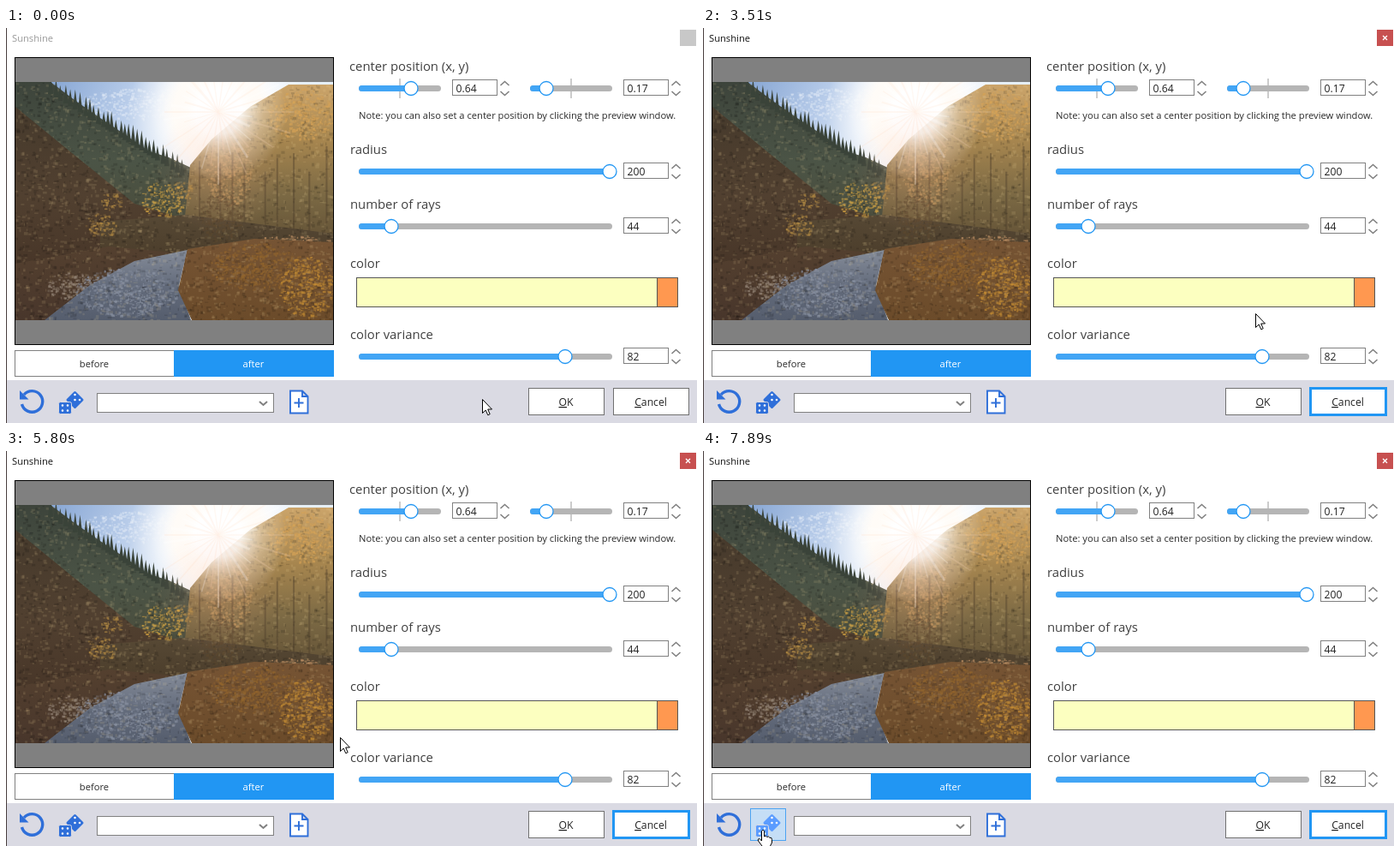
An HTML page with a canvas that plays this animation: 807x461 px, repeating every 8000 ms.

```html
<!DOCTYPE html>
<html lang="en">
<head>
<meta charset="utf-8">
<title>Sunshine</title>
<style>
html, body { margin: 0; width: 807px; height: 461px; overflow: hidden; background: #fff; }
canvas, svg { position: absolute; left: 0; top: 0; }
canvas { left: 11px; top: 63px; }
text { font: 11.2px "Open Sans", "Noto Sans", sans-serif; fill: #2a2a2a; }
.head { font-size: 14.85px; fill: #404040; }
.val, .btn { font-size: 12.2px; fill: #222; }
.mid { text-anchor: middle; }
.tip text { font-size: 11.35px; fill: #505050; }
.line { fill: none; stroke: #808080; stroke-width: 1.6; }
.box { fill: #fff; stroke: #808080; }
.hot { fill: none; stroke: #2196f3; stroke-width: 3; }
.icon { fill: none; stroke: #2f6fd9; }
</style>
</head>
<body>
<canvas id="photo" width="372" height="278"></canvas>
<svg width="807" height="461" viewBox="0 0 807 461">
  <path d="M.5 0V461" stroke="#4a4040"/>
  <text id="title" x="7" y="16">Sunshine</text>
  <g id="shut"><rect x="787" y="2" width="19" height="19"/><path id="cross" d="M794 9l5 5m0-5l-5 5" stroke="#fff" stroke-width="1.3"/></g>

  <path d="M11 35H382V63H11zM11 341H382V370H11z" fill="#808080"/>
  <rect x="10.5" y="34.5" width="372" height="335" fill="none" stroke="#000"/>
  <rect class="box" x="10.5" y="376.5" width="186" height="30"/>
  <rect id="after" x="196" y="376" width="187" height="31"/>
  <text class="mid" x="103" y="396">before</text>
  <text class="mid" x="289" y="396" style="fill:#fff">after</text>

  <g id="panel"></g>
  <text x="412" y="106">Note: you can also set a center position by clicking the preview window.</text>
  <g stroke="#555"><rect x="409.5" y="291.5" width="375" height="34" fill="#fcffc0"/><path d="M760.5 291.5h24v34h-24z" fill="#ff9850"/></g>
  <rect id="color" class="hot" x="409.5" y="291.5" width="351" height="34"/>

  <path d="M1 411H807V461H1z" fill="#dadae3"/>
  <g class="icon" stroke-width="3.4"><path d="M21 428A12.3 12.3 0 1 1 18.500 439"/><path d="M16 423v10.500h10.500z" fill="#2f6fd9" stroke="none"/></g>
  <rect id="dice" x="55.5" y="417.5" width="41" height="37" fill="#c5def6" stroke="#4ba3f2"/>
  <g id="dies">
    <rect x="73" y="426.5" width="15" height="15" rx="1.5" transform="rotate(45 80.5 434)"/>
    <rect x="61.5" y="436.5" width="15" height="14" rx="2" stroke="#dadae3"/>
    <path d="M66 440.500h0M72 440.500h0M66 446.500h0M72 446.500h0M80.500 428h0M80.500 434h0M86 434h0" stroke="#fff" stroke-width="2.6" stroke-linecap="round"/>
  </g>
  <rect class="box" x="106.5" y="426.5" width="206" height="22"/>
  <rect id="combo" class="hot" x="106.5" y="426.5" width="206" height="22"/>
  <path id="drop" class="line" d="M296 436l4.500 4 4.500-4" style="stroke-width:2"/>
  <path class="icon" d="M332 423.500H346L352.500 430V449.500H332zM346 423.500V430H352.500M342 432v11m-5.500-5.500h11" stroke-width="1.9" style="fill:#fff"/>
  <rect id="ok" class="box" x="610.5" y="420.5" width="88" height="31"/>
  <rect id="cancel" class="box" x="709.5" y="420.5" width="88" height="31"/>
  <text class="btn mid" x="654" y="441"><tspan text-decoration="underline">O</tspan>K</text>
  <text class="btn mid" x="753" y="441"><tspan text-decoration="underline">C</tspan>ancel</text>

  <g id="tip" class="tip">
    <path d="M483 393H709V333h3v63H483z" opacity=".4"/>
    <rect x="477.5" y="327.5" width="231" height="65" fill="#fff" stroke="#888"/>
    <text x="483" y="341" style="font-weight:700">Active color</text>
    <text x="483" y="357">#FCFFC0</text>
    <text x="483" y="372">RGB(252, 255, 192)</text>
    <text x="483" y="387">Click to enter a full color selection screen.</text>
  </g>
  <g id="cursor" fill="#fff" stroke="#000" stroke-linejoin="round">
    <path id="arrow" d="M.5 .5V16.500L4.200 13 6.800 18.800 9.200 17.700 6.700 12H11.500z"/>
    <path id="hand" d="M-1.500 13V1.500Q0-1 1.500 1.500V8Q3.500 6 4.800 8.500 6.500 7 7.800 9.300 10.500 8.500 10.500 11.500V15L8.500 19V21.500H-1V19L-5.500 13Q-6.500 10.500-4 10.500z"/>
  </g>
</svg>
<script>
const $ = id => document.getElementById(id);

// ---- settings panel ----
const head = (x, y, label) => `<text class="head" x="${x}" y="${y}">${label}</text>`;
const slider = (x, end, y, knob, value, tick) =>
  (tick ? `<path d="M${tick} ${y - 11}v23" stroke="#ccc" stroke-width="2"/>` : "") +
  `<g stroke-width="7" stroke-linecap="round"><path d="M${x + 3.5} ${y + .5}H${end - 3.5}" stroke="#b5b5b5"/>` +
  `<path d="M${x + 3.5} ${y + .5}H${knob}" stroke="#42a5f5"/></g>` +
  `<circle cx="${knob}" cy="${y + .5}" r="8" fill="#fff" stroke="#2196f3" stroke-width="1.3"/>` +
  `<rect class="box" x="${end + 13.5}" y="${y - 9.5}" width="52" height="18"/>` +
  `<text class="val" x="${end + 17.5}" y="${y + 4.7}">${value}</text>` +
  `<path class="line" d="M${end + 69.5} ${y - 3}l5-4.5 5 4.5m0 7l-5 4.5-5-4.5"/>`;
$("panel").innerHTML =
  head(401, 50, "center position (x, y)") + slider(412, 508, 70, 473, "0.64", 460) + slider(612, 708, 70, 631, "0.17", 660) +
  head(402, 147, "radius") + slider(412, 708, 167, 705, 200) +
  head(402, 211, "number of rays") + slider(412, 708, 231, 450, 44) +
  head(402, 280, "color") +
  head(402, 363, "color variance") + slider(412, 708, 383, 653, 82);

// ---- landscape ----
const g = $("photo").getContext("2d");
let seed = 7;
const rnd = () => (seed = seed * 16807 % 2147483647) / 2147483647;
g.translate(-11, -63);

function shade(fade, ...colors) {
  colors.forEach((c, i) => fade.addColorStop(i / (colors.length - 1), c));
  g.fillStyle = fade;
}
function glow(x, y, r, ...colors) {
  shade(g.createRadialGradient(x, y, 0, x, y, r), ...colors);
  g.fillRect(x - r, y - r, 2 * r, 2 * r);
}
// Shaded shape from y = top to y = end, roughened by fine light and dark flecks
function land(path, top, end, ...colors) {
  const shape = new Path2D(path);
  g.save();
  shade(g.createLinearGradient(0, top, 0, end), ...colors);
  g.fill(shape);
  g.clip(shape);
  for (let i = 0; i < (end - top) * 14; i++) {
    g.fillStyle = i % 2 ? "#0002" : "#ffe0a01c";
    g.fillRect(11 + rnd() * 372, top + rnd() * (end - top), 1 + rnd() * 4, 1 + rnd() * 3);
  }
  g.restore();
}
// Loose cloud of leaves, thinning toward its rim
function tuft(x, y, w, h, color) {
  g.fillStyle = color;
  for (let i = 0; i < w * h / 3; i++) {
    const a = rnd() * 6.28, r = rnd() ** .6;
    g.globalAlpha = .2 + rnd() * .5;
    g.fillRect(x + Math.cos(a) * r * w, y + Math.sin(a) * r * h, 1 + rnd() * 3, 1 + rnd() * 2);
  }
  g.globalAlpha = 1;
}

shade(g.createLinearGradient(50, 63, 215, 150), "#86a5d3", "#b9cdea", "#e6eff9");
g.fillRect(11, 63, 372, 278);
tuft(160, 88, 80, 18, "#dde7f5");
glow(248, 98, 105, "#fff", "#fff", "#fff0");

land("M11 63H52L80 84 110 105 140 125 165 143 190 151 216 163V250H11z", 63, 250, "#3d443b", "#4b5446", "#4a4a38");
for (let x = 52; x < 210; x += 4 + rnd() * 3) {
  const y = 68 + (x - 52) * .62, h = 8 + rnd() * 7;
  g.fillStyle = "#3a4339";
  g.beginPath();
  g.moveTo(x, y - h); g.lineTo(x + 3, y + 9); g.lineTo(x - 3, y + 9);
  g.fill();
}
land("M11 92L82 150 150 205 215 225V270L11 310z", 92, 300, "#463a2c", "#514030", "#453326");
land("M215 160L240 130 285 92 330 66H382V260H205z", 66, 260, "#cba46a", "#a7864f", "#7b6944", "#5e4d33");
tuft(343, 100, 40, 30, "#d6a357");
tuft(260, 165, 28, 42, "#bb935c");
for (let x = 225; x < 380; x += 9 + rnd() * 18) {
  g.fillStyle = "#4a3b2866";
  g.fillRect(x, 135 + rnd() * 35, 2, 90);
}
land("M110 226L210 218 382 240V268H110z", 216, 268, "#574935", "#4b3d2b");
tuft(335, 246, 45, 5, "#bd8f63");
for (const [x, y, size] of [[183, 200, 26], [205, 190, 14], [122, 202, 13], [110, 230, 18]])
  tuft(x, y, size, size * .8, size > 18 ? "#dba944" : "#b68d45");
tuft(250, 222, 25, 32, "#5b482f");

land("M11 275L120 255 195 262 100 300 60 341H11z", 255, 341, "#54402f", "#48362b");
tuft(75, 300, 33, 16, "#97887a");
land("M150 272L212 259 202 300 216 341H45L98 300z", 259, 341, "#858c99", "#646c7c", "#555d6d");
tuft(140, 308, 60, 28, "#8b93a3");
land("M212 258L290 246 382 250V341H217L201 306z", 246, 341, "#765434", "#6b4b2a");
tuft(292, 278, 55, 28, "#93662e");
tuft(350, 302, 32, 36, "#c58d34");

// Sun burst
glow(248, 98, 80, "#fff", "#fffd", "#fff5e855", "#fff0");
for (let i = 0; i < 44; i++) {
  const a = i * Math.PI / 22, r = 40 + rnd() * 50;
  g.strokeStyle = i % 2 ? "#fff4" : "#ffd9c033";
  g.lineWidth = 1 + rnd() * 2;
  g.beginPath(); g.moveTo(248, 98);
  g.lineTo(248 + Math.cos(a) * r, 98 + Math.sin(a) * r);
  g.stroke();
}
glow(248, 165, 75, "#f3a98938", "#f3a98900");

// ---- motion: pointer stops as [step, x, y], moved evenly in steps of 141 ms ----
const stops = [[0, 556, 433], [7, 558, 433], [10, 611, 434], [12, 640, 436], [13, 640, 436], [16, 676, 430],
  [18, 658, 392], [21, 656, 388], [27, 640, 305], [31, 636, 303], [35, 465, 224], [38, 442, 236],
  [41, 390, 334], [44, 362, 396], [45, 362, 396], [49, 251, 440], [50, 251, 440], [56, 70, 442]];
const zones = { ok: [610, 420, 699, 452], color: [409, 291, 761, 326], after: [196, 376, 383, 407],
  combo: [106, 426, 313, 449], dice: [55, 417, 97, 455] };

function pointer(step) {
  const i = Math.max(1, stops.findIndex(s => s[0] >= step));
  const [s0, x0, y0] = stops[i - 1], [s1, x1, y1] = stops[i];
  const k = (step - s0) / (s1 - s0);
  return [Math.round(x0 + (x1 - x0) * k), Math.round(y0 + (y1 - y0) * k)];
}
const set = (id, style) => Object.assign($(id).style, style);
const show = (id, on) => set(id, { display: on ? "" : "none" });
const ring = on => ({ stroke: on ? "#2196f3" : "#707070", strokeWidth: on ? 3 : 1 });

function draw() {
  const t = performance.now() % 8000, active = t >= 150;
  const step = Math.min(56, Math.floor((t + 20) / 141));
  const [x, y] = pointer(step);
  const over = Object.keys(zones).find(k => {
    const [left, top, right, bottom] = zones[k];
    return x >= left && x < right && y >= top && y < bottom;
  });
  set("title", { fill: active ? "#111" : "#999" });
  set("shut", { fill: active ? "#c75050" : "#c8c8c8" });
  show("cross", active);
  set("cancel", ring(active));
  set("ok", { ...ring(over === "ok"), fill: over === "ok" ? "#bbdefb" : "#fff" });
  set("after", { fill: over === "after" ? "#64b5f6" : "#2196f3" });
  set("dies", { fill: over === "dice" ? "#5b9cff" : "#2f6fd9" });
  set("drop", { stroke: over === "combo" ? "#2196f3" : "#808080" });
  for (const id of ["color", "combo", "dice"]) show(id, over === id);
  show("tip", over === "color" && step > 28);
  set("tip", { opacity: Math.min(1, (step - 28) / 2) });
  show("hand", over);
  show("arrow", !over);
  $("cursor").setAttribute("transform", `translate(${x} ${y})`);
  requestAnimationFrame(draw);
}
draw();
</script>
</body>
</html>
```
